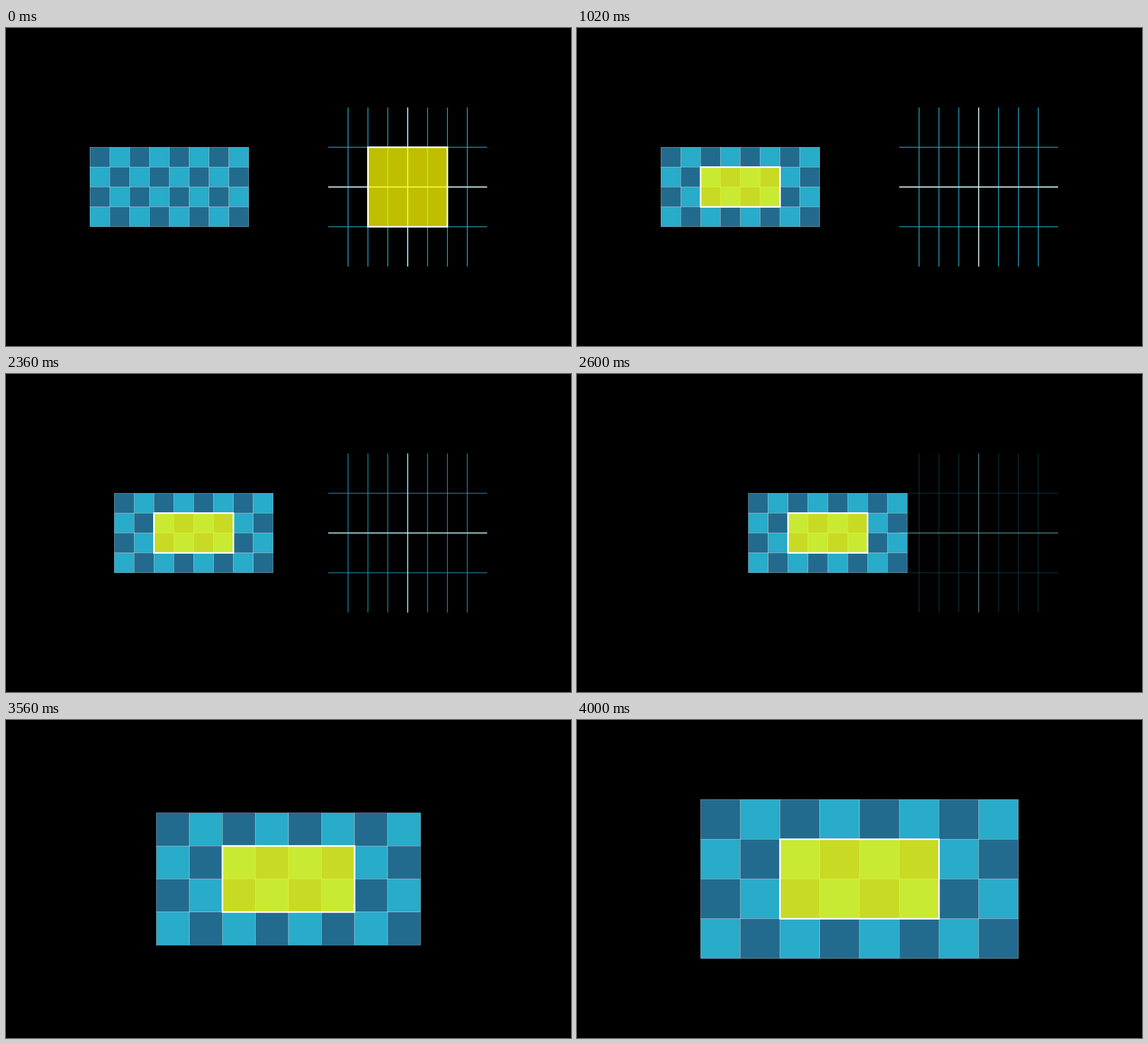
These frames come from a looping animation (998 px wide and 561 px high, 5 s). An HTML page with a canvas:

```html
<!DOCTYPE html>
<html lang="en">
<head>
<meta charset="utf-8">
<title>Checkerboard and plane</title>
<style>
  html, body { margin: 0; width: 100%; height: 100%; overflow: hidden; background: #000; }
  canvas { display: block; }
</style>
</head>
<body>
<canvas id="stage" width="998" height="561"></canvas>
<script>
const W = 998, H = 561, LOOP = 5000;
const UX = W * 9 / 128, UY = H / 8; // pixels per scene unit
const LIGHT = '#29abca', DARK = '#236b8e', WHITE = '#fff';
const ctx = document.getElementById('stage').getContext('2d');

const px = x => W / 2 + x * UX;
const py = y => H / 2 + y * UY;
const mix = (a, b, t) => a + (b - a) * t;
const clamp = t => Math.min(1, Math.max(0, t));
const sigmoid = x => 1 / (1 + Math.exp(-x));

function smooth(t) {
  const edge = sigmoid(-5);
  return clamp((sigmoid(10 * (t - 0.5)) - edge) / (1 - 2 * edge));
}

function line(x1, y1, x2, y2, color) {
  ctx.strokeStyle = color;
  ctx.lineWidth = 0.02 * UX;
  ctx.beginPath();
  ctx.moveTo(px(x1), py(y1));
  ctx.lineTo(px(x2), py(y2));
  ctx.stroke();
}

function box(x, y, w, h, fill, stroke) {
  const rect = [px(x), py(y), w * UX, h * UY];
  ctx.fillStyle = fill;
  ctx.fillRect(...rect);
  ctx.strokeStyle = WHITE;
  ctx.lineWidth = stroke * UX;
  ctx.strokeRect(...rect);
}

function drawBoard(cx, scale) {
  const cell = scale / 2;
  for (let row = 0; row < 4; row++) {
    for (let col = 0; col < 8; col++) {
      const fill = (row + col) % 2 ? LIGHT : DARK;
      box(cx + (col - 4) * cell, (row - 2) * cell, cell, cell, fill, 0.005);
    }
  }
}

function drawPlane(cx, alpha) {
  if (alpha <= 0) return;
  const across = (y, color) => line(cx - 2, y, cx + 2, y, color);
  const down = (x, color) => line(cx + x, -2, cx + x, 2, color);
  ctx.globalAlpha = alpha;
  // Each half starts at zero, so the axes have two blue lines beneath.
  for (const side of [-1, 1]) {
    for (let k = 0; k < 2; k++) across(side * k, LIGHT);
    for (let k = 0; k < 4; k++) down(side * k / 2, LIGHT);
  }
  across(0, WHITE);
  down(0, WHITE);
  ctx.globalAlpha = 1;
}

function draw(ms) {
  // 60 steps a second, shown every 20 ms
  const sec = Math.round(Math.floor(ms / 20) * 1.2) / 60;
  const phase = start => smooth(clamp(sec - start));
  const move = phase(0), shift = phase(2), grow = phase(3);

  const boardX = mix(-3, 0, shift);
  const scale = 1 + grow;
  const squareX = mix(3, -3, move) + 3 * shift;
  const w = 2 * scale, h = mix(2, 1, move) * scale;

  ctx.fillStyle = '#000';
  ctx.fillRect(0, 0, W, H);
  drawBoard(boardX, scale);
  drawPlane(3, 1 - shift);
  box(squareX - w / 2, -h / 2, w, h, 'rgba(255, 255, 0, 0.75)', 0.04);
}

const began = performance.now();
function tick() {
  draw((performance.now() - began) % LOOP);
  requestAnimationFrame(tick);
}
tick();
</script>
</body>
</html>
```
